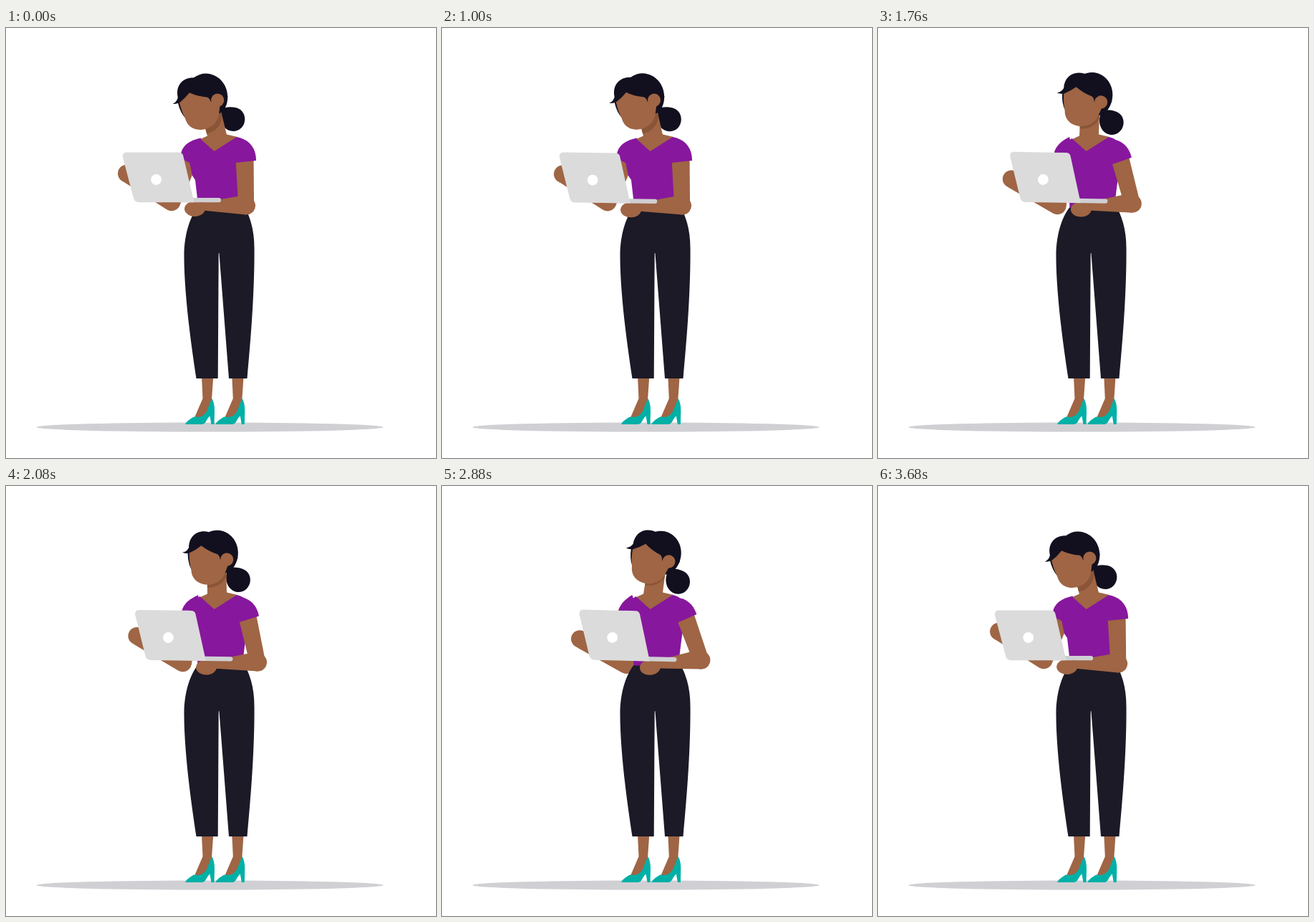
These frames come from a looping animation (600x600 px, 3720 ms). An HTML page:

```html
<!DOCTYPE html>
<html lang="en">
<head>
<meta charset="utf-8">
<title>Woman with laptop</title>
<style>
  html, body { margin: 0; width: 100%; height: 100%; overflow: hidden; background: #fff; }
  svg { display: block; width: 100vw; height: 100vh; }
  .skin { fill: #9f6544; }
  .limb { fill: none; stroke: #9f6544; stroke-linecap: round; stroke-linejoin: round; }
  .shade { fill: #8a5537; }
  .hair { fill: #12101f; }
  .top { fill: #87179d; }
  .teal { fill: #00b0a6; }
</style>
</head>
<body>
<svg viewBox="0 0 600 600">
  <defs>
    <clipPath id="neckClip"><path id="neckEdge"/></clipPath>
    <path id="face" d="M256 88L242 104Q245 117 250 126C253 137 261 142 271 142C284 142 295 133 297 121L300 96Z"/>
    <g id="leg">
      <path class="skin" d="M273 486H289.3L287 519L281 540L262 546L274.5 517Z"/>
      <path class="teal" d="M250 553Q251 549 262 542.5Q275 545 280.500 534Q284 524 287.500 517Q291 524 291 534L290.500 553H286.500L284.500 541.500Q282 543 279 549Q277 553 273 553Z"/>
    </g>
  </defs>

  <ellipse cx="284.500" cy="557" rx="242" ry="6.600" fill="#d0d0d4"/>
  <use href="#leg"/>
  <use href="#leg" x="42.300"/>

  <path id="farArm" class="limb" stroke-width="25"/>
  <circle id="farHand" class="skin" r="12.200"/>
  <path id="farSleeve" class="top" d="M272 153.500C255 157 243 165 243.500 182L257 188.500L272 186Z"/>

  <g id="bun">
    <path class="hair" d="M299 114C304 110 313 109.500 319 110.700C328 112 333.300 119 333.300 127C333.300 137 326 144 317 144C307 144 300 135 299 125Z"/>
  </g>
  <path id="neck" class="skin"/>
  <path class="skin" d="M269 156L281 150.500Q295 147 307 148.200L323 152L291 175Z"/>
  <g clip-path="url(#neckClip)"><use id="jaw" class="shade" href="#face"/></g>

  <path class="top" d="M270.500 154L290.500 172L322 152C332 154 338 160 340 170L338 188Q334 214 331.500 236L333 254H267.500L267 238L264 212L260 206L256 187L262 160Z"/>
  <path fill="#1b1a26" d="M267 250.500H333Q338 258 342 272Q346.500 288 346.500 308C347 370 341 440 336.500 489H311L297.500 315Q296.800 312 296.700 316L295.700 489H265.500C258 440 248.500 370 248.500 317C248.500 294 254 268 267 250.500Z"/>

  <g id="head">
    <path class="hair" d="M246 86L239.800 104Q243 118 250.500 126L262 100Z"/>
    <path class="hair" d="M256 84L298 119.500Q303 116 306 111Q309.500 104 309.300 95L290 70Z"/>
    <use class="skin" href="#face"/>
    <path class="hair" d="M232.500 105.500Q238 104 239.800 97C236 81 246 69 262 69.300C268 65 274 63.300 279 63.500C296 64 309 78 309.300 96L300 104L286 103Q285 99 281.500 96.800Q267 95.500 256 90.300Q250 98 243 103.500Q237 107 232.500 105.500Z"/>
    <circle class="skin" cx="295.200" cy="100.700" r="9.100"/>
  </g>

  <g id="fore" class="skin">
    <path d="M335.500 234L323 235L264 245V253.500L335 260.500Z"/>
    <ellipse cx="263.500" cy="252.300" rx="14.500" ry="10.700"/>
    <circle cx="335.500" cy="248" r="12.500"/>
  </g>
  <g id="upper">
    <path class="skin" d="M320.300 180H345.500L346 242L348 248L335.500 255L323.500 236Z"/>
    <path class="top" d="M325 152.800C341 157 349 169 349 185L320.500 188L318 164Z"/>
  </g>

  <g id="laptop">
    <rect x="240" y="237" width="60" height="6.300" rx="3.100" fill="#cfcfd2"/>
    <path fill="#dbdbdb" d="M169 173.500H241Q246 173.500 247.200 178L262.500 243.300H186Q179.500 243.300 178 237.500L163 180.500Q162 173.500 169 173.500Z"/>
    <circle cx="209.600" cy="211.500" r="7.400" fill="#fff"/>
  </g>
</svg>
<script>
const LOOP = 3720, STEP = 40;
// [time, value] keys, eased between neighbours
const SWAY = [[0, 0], [1200, 0], [1860, 22], [2260, 13], [2960, 28.5], [LOOP, 0]];
const TILT = [[0, 0], [600, 2.8], [1200, 0], [LOOP, 0]];
const SHOULDER = [333, 162], ELBOW = [335.5, 248], HAND = [263.5, 252.3];
const DEG = Math.PI / 180;

const el = id => document.getElementById(id);
const set = (id, attrs) => {
  for (const k in attrs) el(id).setAttribute(k, attrs[k]);
};
const move = (id, transform) => set(id, { transform });

function sample(keys, t) {
  const i = keys.findIndex(k => k[0] > t);
  const [t0, a] = keys[i - 1], [t1, b] = keys[i];
  return a + (b - a) * (1 - Math.cos(Math.PI * (t - t0) / (t1 - t0))) / 2;
}

function turn([x, y], [cx, cy], deg) {
  const c = Math.cos(deg * DEG), s = Math.sin(deg * DEG);
  return [cx + (x - cx) * c - (y - cy) * s, cy + (x - cx) * s + (y - cy) * c];
}

const heading = (a, b) => Math.atan2(b[1] - a[1], b[0] - a[0]) / DEG;

function draw(t) {
  const x = sample(SWAY, t), tilt = sample(TILT, t);
  const nod = 0.8 * x + 1.2 * tilt, k = nod / 22;

  move('head', `rotate(${nod} 294 156.7)`);
  move('bun', `translate(${12.3 * k} ${6.5 * k}) rotate(${nod * 0.6} 316.5 127.5)`);
  move('jaw', `translate(${4 - 3.5 * k} ${6 - 3.5 * k}) rotate(${nod} 294 156.7)`);
  const d = `M${274 + 11 * k} 125L${298 + 15 * k} 108L308 149L300 158H281V151Z`;
  set('neck', { d });
  set('neckEdge', { d });

  const swing = -0.64 * x;
  const elbow = turn(ELBOW, SHOULDER, swing);
  const hand = [HAND[0] + 0.95 * x, HAND[1] + 0.03 * x + 1.95 * tilt];
  let bend = heading(elbow, hand) - heading(ELBOW, HAND);
  if (bend > 180) bend -= 360;
  if (bend < -180) bend += 360;
  move('upper', `rotate(${swing} ${SHOULDER})`);
  move('fore', `translate(${elbow}) rotate(${bend}) translate(${-ELBOW[0]} ${-ELBOW[1]})`);

  const cx = 168.2 + 0.86 * x, cy = 203 + 0.37 * x + 1.1 * tilt;
  set('farHand', { cx, cy });
  set('farArm', { d: `M258 177L${231 + 0.93 * x} ${242.7 + 0.24 * x + 0.3 * tilt}L${cx + 4} ${cy + 2}` });
  move('farSleeve', `rotate(${-0.7 * x} 264 172)`);

  move('laptop', `translate(${0.965 * x} ${-0.04 * x}) rotate(${tilt + 0.045 * x} 160 260)`);
}

const start = performance.now();
function tick() {
  const t = (performance.now() - start) % LOOP;
  draw(Math.floor(t / STEP) * STEP);
  requestAnimationFrame(tick);
}
draw(0);
requestAnimationFrame(tick);
</script>
</body>
</html>
```
